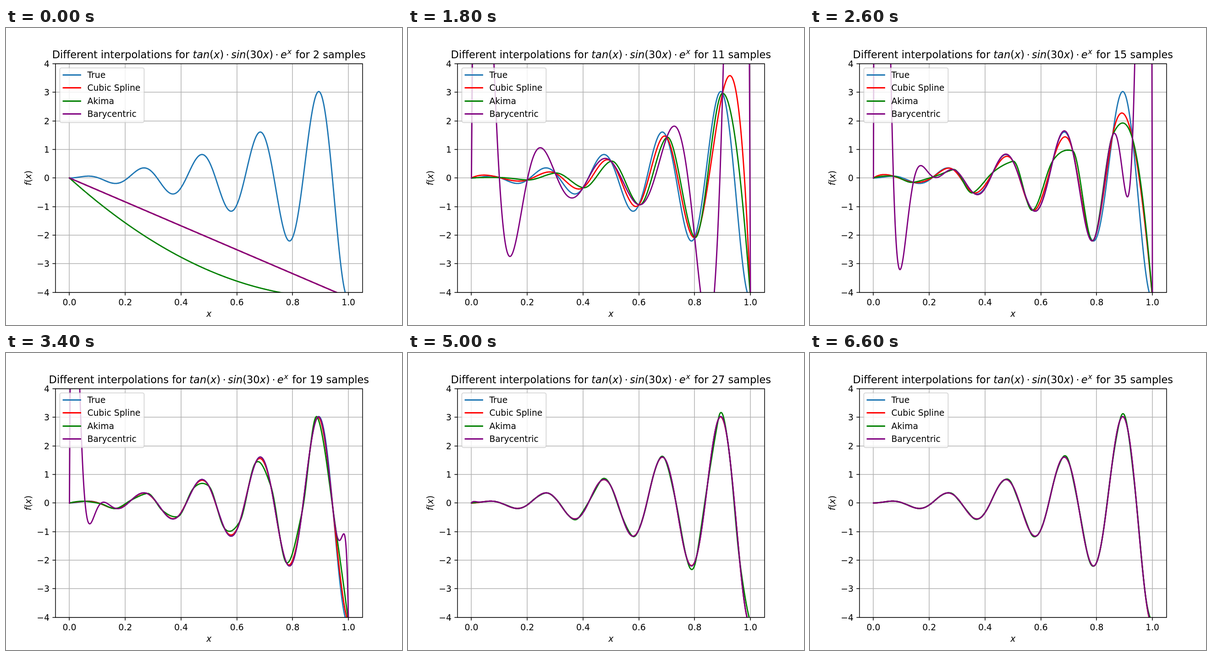
Animation, 864 px wide and 648 px high, one loop 6.8 s. Source, as an HTML page:

```html
<!DOCTYPE html>
<html lang="en">
<head>
<meta charset="utf-8">
<title>Interpolations</title>
<style>
html, body { margin: 0; width: 100%; height: 100%; overflow: hidden; background: #fff; }
svg { display: block; width: 864px; height: 648px; }
text { font: 18.75px "DejaVu Sans", sans-serif; font-variant-ligatures: none; white-space: pre; }
.title { font-size: 22.5px; }
.it { font-style: italic; }
.curve { fill: none; stroke-width: 2.8125; stroke-linecap: square; stroke-linejoin: round; }
</style>
</head>
<body>
<svg viewBox="0 0 864 648">
  <defs><clipPath id="area"><rect x="108" y="78" width="670" height="499"/></clipPath></defs>
  <g id="grid" stroke="#b0b0b0" stroke-width="1.5"></g>
  <g id="curves" clip-path="url(#area)"></g>
  <g id="ticks" stroke="#000" stroke-width="1.5"></g>
  <rect x="108" y="78" width="670" height="499" fill="none" stroke="#000" stroke-width="1.5"/>
  <g id="labels"></g>
  <text x="442.8" y="630" text-anchor="middle" class="it">x</text>
  <text transform="translate(55 327.2) rotate(-90)" text-anchor="middle"><tspan class="it">f</tspan>(<tspan class="it">x</tspan>)</text>
  <text class="title" x="442.8" y="66" text-anchor="middle">Different interpolations for <tspan class="it">tan</tspan>(<tspan class="it">x</tspan>)<tspan dx="4.4">⋅</tspan><tspan class="it" dx="4.4">sin</tspan>(30<tspan class="it">x</tspan>)<tspan dx="4.4">⋅</tspan><tspan class="it" dx="4.4">e</tspan><tspan class="it" dx="1" dy="-8.6" font-size="15.75" style="font-size:15.75px">x</tspan><tspan dx="1.5" dy="8.6"> for <tspan id="count">2</tspan> samples</tspan></text>
  <g id="legend">
    <rect x="117.4" y="87.1" width="184" height="119.2" rx="3.75" fill="#fff" stroke="#ccc" stroke-width="1.875" opacity="0.8"/>
  </g>
</svg>
<script>
const STEP = 200, FIRST = 2, COUNT = 34, POINTS = 1000;
const $ = id => document.getElementById(id);
const px = x => 108 + (x + 0.05) / 1.1 * 669.6;
const py = y => 327.24 - y * 62.37;
const f = x => Math.tan(x) * Math.sin(30 * x) * Math.exp(x);

function add(parent, tag, attrs, text) {
  const el = document.createElementNS("http://www.w3.org/2000/svg", tag);
  for (const k in attrs) el.setAttribute(k, attrs[k]);
  if (text) el.textContent = text;
  parent.appendChild(el);
  return el;
}
const line = (parent, x1, y1, x2, y2) => add(parent, "line", { x1, y1, x2, y2 });

for (let i = 0; i <= 5; i++) {
  const x = Math.round(px(i / 5));
  line($("grid"), x, 78, x, 577);
  line($("ticks"), x, 577, x, 583.6);
  add($("labels"), "text", { x: px(i / 5), y: 604.6, "text-anchor": "middle" }, (i / 5).toFixed(1));
}
for (let v = -4; v <= 4; v++) {
  const y = Math.round(py(v));
  line($("grid"), 108, y, 778, y);
  line($("ticks"), 101.4, y, 108, y);
  add($("labels"), "text", { x: 94.9, y: py(v) + 7, "text-anchor": "end" }, (v < 0 ? "−" : "") + Math.abs(v));
}

// Piecewise evaluation on n evenly spaced nodes: piece(i, u), u in 0..1
const pieces = (n, piece) => x => {
  const i = Math.min(n - 2, Math.floor(x * (n - 1)));
  return piece(i, x * (n - 1) - i);
};

// Not-a-knot cubic spline; m holds second derivatives times h²
function spline(y) {
  const n = y.length, m = new Array(n).fill(0);
  const bend = i => y[i - 1] - 2 * y[i] + y[i + 1];
  if (n === 3) m.fill(bend(1));
  if (n > 3) {
    m[1] = bend(1);
    m[n - 2] = bend(n - 2);
    for (let pass = 0; pass < 60; pass++)
      for (let i = 2; i < n - 2; i++) m[i] = (6 * bend(i) - m[i - 1] - m[i + 1]) / 4;
    m[0] = 2 * m[1] - m[2];
    m[n - 1] = 2 * m[n - 2] - m[n - 3];
  }
  return pieces(n, (i, u) => {
    const w = 1 - u;
    return w * y[i] + u * y[i + 1] + ((w ** 3 - w) * m[i] + (u ** 3 - u) * m[i + 1]) / 6;
  });
}

function akima(y) {
  const n = y.length, s = [];
  for (let i = 0; i < n - 1; i++) s[i + 2] = y[i + 1] - y[i];
  if (n === 2) s[3] = s[2] + 9.15;   // a single slope needs an assumed neighbour
  s[1] = 2 * s[2] - s[3];
  s[0] = 2 * s[1] - s[2];
  s[n + 1] = 2 * s[n] - s[n - 1];
  s[n + 2] = 2 * s[n + 1] - s[n];
  const d = y.map((_, i) => {
    const a = Math.abs(s[i + 3] - s[i + 2]), b = Math.abs(s[i + 1] - s[i]);
    return a + b > 1e-9 ? (a * s[i + 1] + b * s[i + 2]) / (a + b) : (s[i] + s[i + 3]) / 2;
  });
  return pieces(n, (i, u) => {
    const r = y[i + 1] - y[i];
    return y[i] + u * (d[i] + u * (3 * r - 2 * d[i] - d[i + 1] + u * (d[i] + d[i + 1] - 2 * r)));
  });
}

function barycentric(y) {
  const n = y.length, w = [1];
  for (let i = 1; i < n; i++) w[i] = -w[i - 1] * (n - i) / i;
  return x => {
    let top = 0, bottom = 0;
    for (let i = 0; i < n; i++) {
      const gap = x * (n - 1) - i;
      if (Math.abs(gap) < 1e-11) return y[i];
      top += w[i] / gap * y[i];
      bottom += w[i] / gap;
    }
    return top / bottom;
  };
}

function path(fn) {
  let d = "";
  for (let i = 0; i < POINTS; i++) {
    const x = i / (POINTS - 1);
    d += (i ? "L" : "M") + px(x).toFixed(2) + " " + py(fn(x)).toFixed(2);
  }
  return d;
}

const series = [
  ["True", "#1f77b4", () => f, 102.5],
  ["Cubic Spline", "#ff0000", spline, 130.5],
  ["Akima", "#008000", akima, 159.5],
  ["Barycentric", "#800080", barycentric, 187.5]
].map(([name, stroke, make, y]) => {
  add($("legend"), "path", { class: "curve", stroke, d: `M125 ${y}H162.5` });
  add($("legend"), "text", { x: 177.4, y: y + 6.5 }, name);
  return { make, el: add($("curves"), "path", { class: "curve", stroke }) };
});

let shown = 0;
function draw(ms) {
  const n = FIRST + Math.floor(ms / STEP) % COUNT;
  if (n === shown) return;
  shown = n;
  const y = Array.from({ length: n }, (_, i) => f(i / (n - 1)));
  for (const { make, el } of series) el.setAttribute("d", path(make(y)));
  $("count").textContent = n;
}

const start = performance.now();
function tick() {
  draw(performance.now() - start);
  requestAnimationFrame(tick);
}
tick();
</script>
</body>
</html>
```
